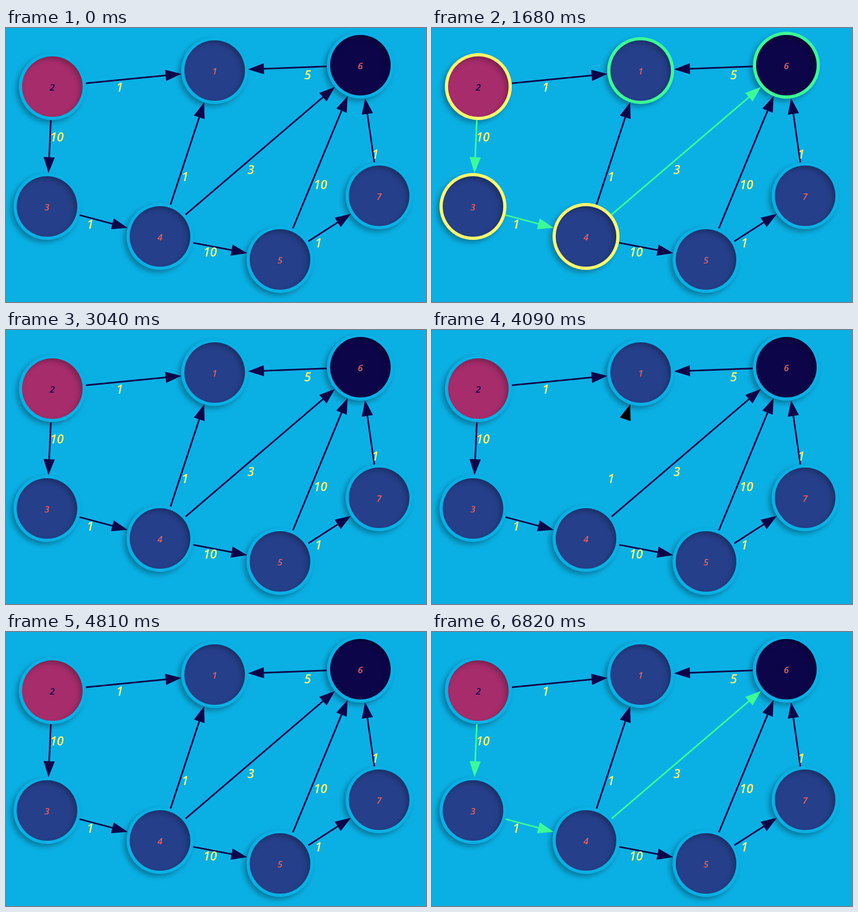
These frames come from a looping animation (784x512 px, 6.84 s). An HTML page with a canvas:

```html
<!DOCTYPE html>
<html lang="en">
<head>
<meta charset="utf-8">
<title>Graph traversal</title>
<style>
  html, body { margin: 0; width: 100%; height: 100%; overflow: hidden; background: #0ab0e4; }
  canvas { display: block; }
</style>
</head>
<body>
<canvas id="stage" width="784" height="512"></canvas>
<script>
const ctx = document.getElementById('stage').getContext('2d');
const LOOP = 6840;
const BACK = [10, 176, 228], YELLOW = [255, 250, 110], GREEN = [61, 250, 152];
const DARK = '#0d0549', BLUE = '#253f8a', PINK = '#a62c6b', RED = '#ee5f5b', LABEL = '#fff870';
const INNER = 56.5, RING = 6, OUTER = INNER + RING;
const rgb = c => `rgb(${c.map(Math.round).join(',')})`;

const nodes = {
  1: { x: 389.5, y: 79.5, green: 510 },
  2: { x: 86.5, y: 109.5, fill: PINK, text: DARK, green: 320, yellow: 510 },
  3: { x: 76.5, y: 333.5, green: 700, yellow: 880 },
  4: { x: 287.5, y: 389.5, green: 880, yellow: 1070 },
  5: { x: 511.5, y: 432.5 },
  6: { x: 661.5, y: 69.5, fill: DARK, green: 1070 },
  7: { x: 696.5, y: 313.5 }
};

// In relaxation order; "on" holds the times at which a path edge lights up.
const edges = [
  { from: 2, to: 1, weight: 1, x: 212, y: 111 },
  { from: 2, to: 3, weight: 10, x: 95, y: 204, on: [1280, 5360] },
  { from: 3, to: 4, weight: 1, x: 157, y: 367, on: [1460, 5540] },
  { from: 4, to: 1, weight: 1, x: 334, y: 278 },
  { from: 4, to: 5, weight: 10, x: 381, y: 419 },
  { from: 4, to: 6, weight: 3, x: 457, y: 265, on: [1680, 5700] },
  { from: 5, to: 6, weight: 10, x: 587, y: 293 },
  { from: 5, to: 7, weight: 1, x: 583, y: 402 },
  { from: 6, to: 1, weight: 5, x: 563, y: 88 },
  { from: 7, to: 6, weight: 1, x: 689, y: 236 }
];
const RESET = 2620, FADE = 420;
const ROUNDS = [3710, 4030, 4300, 4610, 4890, 5100], FLASH = 20;

// The CSS "ease" curve: cubic-bezier(.25, .1, .25, 1)
function ease(x) {
  const bezier = (s, a, b) => 3 * (1 - s) ** 2 * s * a + 3 * (1 - s) * s * s * b + s ** 3;
  let lo = 0, hi = 1;
  for (let i = 0; i < 20; i++) {
    const mid = (lo + hi) / 2;
    if (bezier(mid, .25, .25) < x) lo = mid; else hi = mid;
  }
  return bezier(lo, .1, 1);
}

function ringColor(node, t) {
  if (!(t >= node.green)) return rgb(BACK);
  const lit = t >= node.yellow ? YELLOW : GREEN;
  const k = ease(Math.min(1, Math.max(0, (t - RESET) / FADE)));
  return rgb(lit.map((v, i) => v + (BACK[i] - v) * k));
}

function disc(x, y, r, color) {
  ctx.beginPath();
  ctx.arc(x, y, r, 0, 2 * Math.PI);
  ctx.fillStyle = color;
  ctx.fill();
}

function setShadow(color, blur) {
  ctx.shadowColor = color;
  ctx.shadowBlur = blur;
  ctx.shadowOffsetX = -5;
  ctx.shadowOffsetY = 5;
}

function write(text, x, y, size, color) {
  ctx.font = `italic 600 ${size}px "Open Sans", sans-serif`;
  ctx.textAlign = 'center';
  ctx.fillStyle = color;
  ctx.fillText(text, x, y + size * .357);
}

function drawNode(id, node, t) {
  const { x, y } = node;
  ctx.save();
  setShadow('rgba(0,0,0,.3)', 10);
  disc(x, y, OUTER, ringColor(node, t));
  ctx.restore();
  disc(x, y, INNER, node.fill || BLUE);

  // Inset shadow: a surrounding frame casts it into the clipped disc.
  ctx.save();
  ctx.clip();
  setShadow('rgba(0,0,0,.25)', 10);
  ctx.beginPath();
  ctx.rect(x - 100, y - 100, 200, 200);
  ctx.arc(x, y, INNER + .5, 0, 2 * Math.PI);
  ctx.fillStyle = '#000';
  ctx.fill('evenodd');
  ctx.restore();
  write(id, x, y + 1.5, 17, node.text || RED);
}

function drawEdge(edge, t, flashing) {
  const a = nodes[edge.from], b = nodes[edge.to];
  const length = Math.hypot(b.x - a.x, b.y - a.y);
  const lit = edge.on && (t >= edge.on[1] || (t >= edge.on[0] && t < RESET));
  const color = lit ? rgb(GREEN) : DARK;
  const tip = length - OUTER, base = tip - 29.5;
  ctx.save();
  ctx.translate(a.x, a.y);
  ctx.rotate(Math.atan2(b.y - a.y, b.x - a.x));
  if (!flashing) {
    ctx.beginPath();
    ctx.moveTo(OUTER + .5, 0);
    ctx.lineTo(base + 1, 0);
    ctx.lineWidth = 3;
    ctx.strokeStyle = color;
    ctx.stroke();
  }
  ctx.beginPath();
  ctx.moveTo(tip, 0);
  ctx.lineTo(base, -10.5);
  ctx.lineTo(base, 10.5);
  ctx.fillStyle = flashing ? '#000' : color;
  ctx.fill();
  ctx.restore();
}

function flashingEdge(t) {
  const start = ROUNDS.filter(r => r <= t).pop();
  return start === undefined ? undefined : edges[Math.floor((t - start) / FLASH)];
}

function draw(t) {
  ctx.fillStyle = rgb(BACK);
  ctx.fillRect(0, 0, 784, 512);
  for (const id in nodes) drawNode(id, nodes[id], t);
  const flashed = flashingEdge(t);
  for (const edge of edges) drawEdge(edge, t, edge === flashed);
  for (const edge of edges) write(edge.weight, edge.x, edge.y, 23, LABEL);
}

const began = performance.now();
function tick() {
  draw((performance.now() - began) % LOOP);
  requestAnimationFrame(tick);
}
tick();
</script>
</body>
</html>
```
